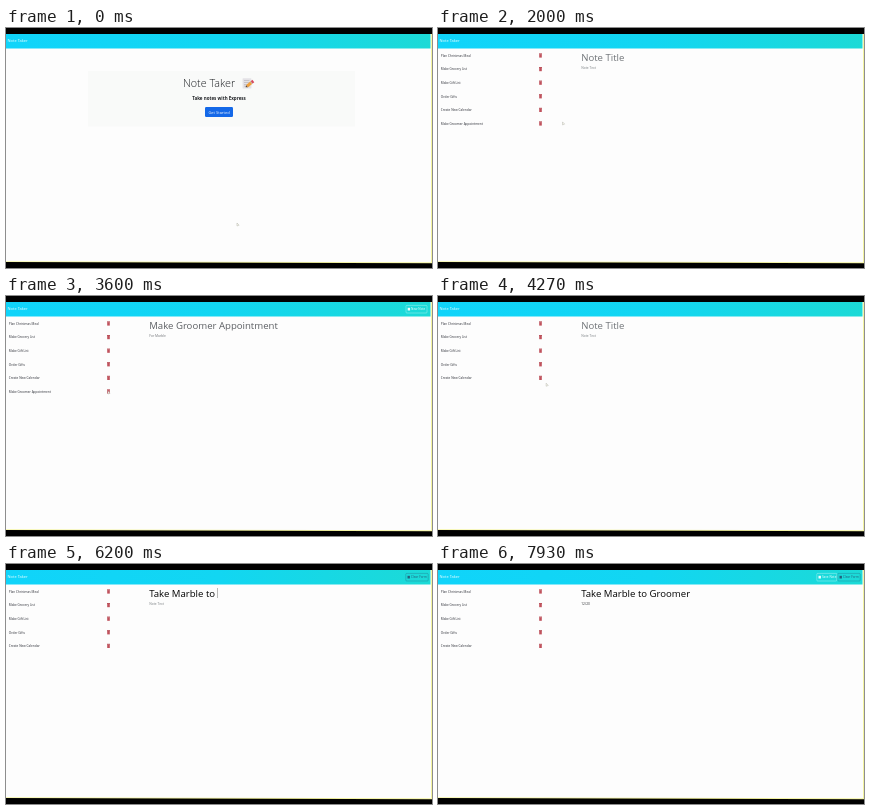
These frames come from a looping animation (426 by 240 pixels, 8000 ms). An HTML page with a canvas:

```html
<!DOCTYPE html>
<html lang="en">
<head>
<meta charset="utf-8">
<title>Note Taker</title>
<style>
  html, body { margin: 0; width: 100%; height: 100%; overflow: hidden; background: #000; }
  canvas { display: block; width: 100vw; height: 100vh; }
</style>
</head>
<body>
<canvas id="stage"></canvas>
<script>
const W = 426, H = 240, LOOP = 8000;
const FONT = '"Open Sans", "Noto Sans", sans-serif';
const canvas = document.getElementById('stage');
const ctx = canvas.getContext('2d');

const notes = ['Plan Christmas Meal', 'Make Grocery List', 'Make Gift List',
  'Order Gifts', 'Create New Calendar', 'Make Groomer Appointment'];
const newTitle = 'Take Marble to Groomer';
const newText = '12/20';

const at = { enter: 930, open: 2400, remove: 3930, focus: 4800,
  title: 5270, titleEnd: 6600, text: 7130, textEnd: 7600 };

// Pointer stops: time, x, y
const path = [[0, 231, 195], [750, 213, 86], [1500, 213, 86], [2270, 90, 97],
  [3000, 90, 97], [3530, 102, 95], [4130, 102, 95], [4800, 156, 27]];

const clamp = v => Math.max(0, Math.min(1, v));
const ease = v => v * v * (3 - 2 * v);

function rect(x, y, w, h, color) {
  ctx.fillStyle = color;
  ctx.fillRect(x, y, w, h);
}

function poly(points, color) {
  ctx.beginPath();
  points.forEach(([x, y]) => ctx.lineTo(x, y));
  ctx.closePath();
  ctx.fillStyle = color;
  ctx.fill();
}

function box(x, y, w, h, r) {
  ctx.beginPath();
  ctx.roundRect(x, y, w, h, r);
}

function label(str, x, y, size, color, weight = 400, align = 'left') {
  ctx.font = `${weight} ${size}px ${FONT}`;
  ctx.textAlign = align;
  ctx.fillStyle = color;
  ctx.fillText(str, x, y);
}

function typed(str, t, start, end) {
  return str.slice(0, Math.floor(clamp((t - start) / (end - start)) * str.length));
}

function drawFrame() {
  rect(0, 0, W, H, '#000');
  // The page's lower edge tilts slightly
  poly([[0, 6], [W, 6], [W, 235.2], [0, 234]], '#f4f4a0');
  poly([[0, 6], [425, 6], [425, 234.2], [0, 233.2]], '#fdfdfd');
  const g = ctx.createLinearGradient(0, 0, W, 0);
  g.addColorStop(0, '#10d4fa');
  g.addColorStop(0.5, '#12d6f2');
  g.addColorStop(1, '#1cdad6');
  rect(0, 6, 424.5, 14.5, g);
  label('Note Taker', 1.6, 14.3, 4, '#f2feff');
}

function memo(x, y) {
  ctx.save();
  ctx.translate(x, y);
  box(0.6, 1.2, 8.8, 10.4, 0.6);
  ctx.fillStyle = '#e4e2e6';
  ctx.fill();
  for (let i = 0; i < 4; i++) rect(2, 3.4 + i * 1.8, 5.4, 0.5, '#a8a5ad');
  ctx.translate(4.2, 9.8);
  ctx.rotate(-Math.PI / 4.6);
  poly([[-0.8, 0], [1.2, -1.5], [1.2, 1.5]], '#5b4638');
  rect(1.2, -1.5, 5.2, 3, '#f0a03c');
  rect(6.4, -1.5, 0.7, 3, '#a5a5a5');
  rect(7.1, -1.5, 2.1, 3, '#d9485c');
  ctx.restore();
}

function drawHome() {
  rect(82, 43, 267, 55.5, '#f9faf9');
  label('Note Taker', 177, 59.3, 10.8, '#1c1e22', 300);
  memo(236, 49);
  label('Take notes with Express', 213, 71.7, 4.5, '#202226', 700, 'center');
  box(199, 79, 28, 10, 1.2);
  ctx.fillStyle = '#1468e8';
  ctx.fill();
  label('Get Started', 213, 85.8, 4, '#f4f8ff', 400, 'center');
}

function bin(x, y) {
  rect(x + 0.2, y + 0.8, 2.6, 3.4, '#c0525c');
  rect(x, y, 3, 0.9, '#b4444e');
}

function drawList(count) {
  notes.slice(0, count).forEach((note, i) => {
    const y = 27.5 + i * 13.6;
    label(note, 2.8, y + 1.2, 3.15, '#2e3038', 500);
    bin(101, y - 2.1);
  });
}

function headButton(str, x, w, color) {
  box(x, 9.4, w, 7.6, 0.9);
  ctx.strokeStyle = color;
  ctx.lineWidth = 0.45;
  ctx.globalAlpha = 0.7;
  ctx.stroke();
  ctx.globalAlpha = 1;
  rect(x + 1.7, 11.8, 2.4, 2.7, color);
  label(str, x + 5.1, 14.4, 3.1, color, 500);
}

function fields(title, titleColor, text, textColor) {
  ctx.save();
  ctx.beginPath();
  ctx.rect(141, 22, 280, 12.6);
  ctx.clip();
  label(title, 143.2, 32.9, 9.6, titleColor);
  ctx.restore();
  label(text, 143.2, 41.1, 3.3, textColor);
}

function drawNotes(t) {
  drawList(t < at.remove ? 6 : 5);
  if (t >= at.open && t < at.remove) {
    fields(notes[5], '#5c5f63', 'For Marble', '#6f7276');
    headButton('New Note', 400, 21, '#f2feff');
    return;
  }
  const title = typed(newTitle, t, at.title, at.titleEnd);
  const text = typed(newText, t, at.text, at.textEnd);
  fields(title || 'Note Title', title ? '#000' : '#707478',
    text || 'Note Text', text ? '#303236' : '#7c8084');
  if (title) headButton('Clear Form', 399.8, 22.4, '#24607c');
  if (text) headButton('Save Note', 378.8, 20, '#f2feff');
  if (t >= at.title && t < at.text - 200) {
    ctx.font = `400 9.6px ${FONT}`;
    rect(142.8 + ctx.measureText(title).width, 24, 0.6, 10, '#8c8c88');
  }
}

function drawPointer(t) {
  if (t >= at.title) return;
  let i = path.length - 1;
  while (path[i][0] > t) i--;
  const a = path[i], b = path[i + 1] || a;
  const k = b === a ? 0 : ease((t - a[0]) / (b[0] - a[0]));
  const x = a[1] + (b[1] - a[1]) * k, y = a[2] + (b[2] - a[2]) * k;
  if (t > at.focus) {
    rect(x, y - 1.5, 0.5, 4, '#777');
    return;
  }
  poly([[x, y], [x, y + 3], [x + 2.1, y + 2.2]], '#fffff2');
  ctx.strokeStyle = '#a0a098';
  ctx.lineWidth = 0.4;
  ctx.stroke();
}

function draw(t) {
  drawFrame();
  if (t < at.enter) drawHome();
  else drawNotes(t);
  drawPointer(t);
}

function fit() {
  const dpr = window.devicePixelRatio || 1;
  canvas.width = Math.round(innerWidth * dpr);
  canvas.height = Math.round(innerHeight * dpr);
  ctx.setTransform(canvas.width / W, 0, 0, canvas.height / H, 0, 0);
}

function loop() {
  draw(performance.now() % LOOP);
  requestAnimationFrame(loop);
}

addEventListener('resize', fit);
fit();
loop();
</script>
</body>
</html>
```
